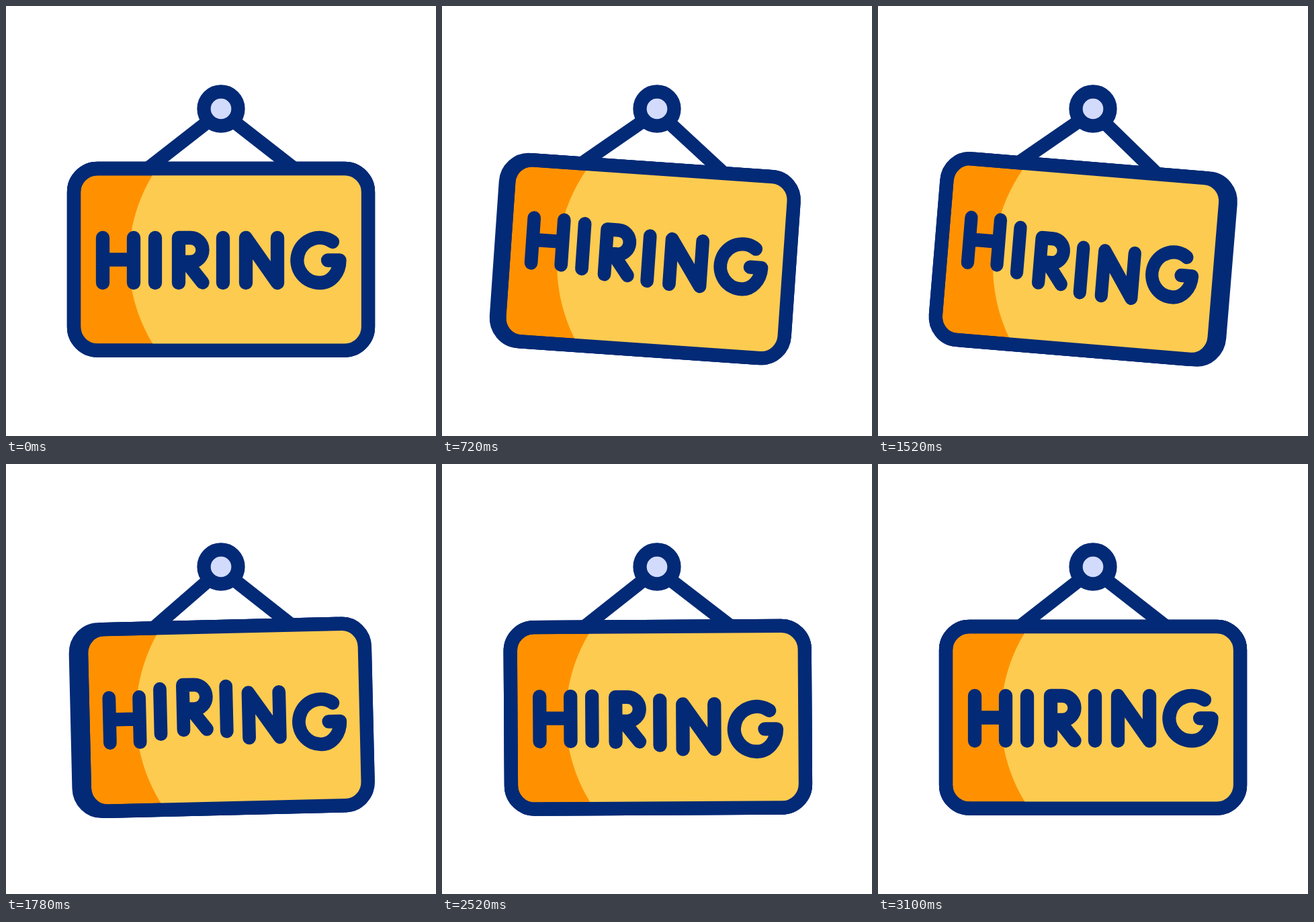
Animation of 640x640 px, one loop 3280 ms. Source, as an HTML page with a canvas:

```html
<!DOCTYPE html>
<html lang="en">
<head>
<meta charset="utf-8">
<title>Hiring sign</title>
<style>
html, body { margin: 0; width: 100%; height: 100%; overflow: hidden; background: #fff; }
canvas { display: block; width: 100vmin; height: 100vmin; }
</style>
</head>
<body>
<canvas id="stage" width="640" height="640"></canvas>
<script>
const ctx = document.getElementById('stage').getContext('2d');
const LOOP = 3280;
const NAVY = '#032a76', ORANGE = '#ff9100', YELLOW = '#fdcb50', PALE = '#d3dbfd';
const PEG = { x: 320, y: 153 };

// Keyframes: times paired with values, eased with a half cosine.
const swing = [[20, 415, 800, 1185, 1560, 1934, 2319, 2704, 3110], [0, -5, 5, -5, 5, -5, 5, -5, 0]];
const bounce = [[335, 750, 1165, 1580, 1995, 2410], [0, -17.5, 17.5, -17.5, 17.5, 0]];
const LETTER_DELAY = 95;

// The board turns left, right, then left again, resting flat in between.
const turns = (flat, a, b, c) =>
  [[100, 450, 811, 1245, 1668, 1995, 2320], [flat, a, flat, b, flat, c, flat]];
const depth = turns(0, -29.5, 27.5, -31.5);
const panelWidth = turns(1, .806, .817, .86);
const textWidth = turns(1, .812, .815, .898);
const stringWidth = turns(1, .82, .817, .78);

const letters = [
  'M144 345V412M190 345V412M144 377.5H190',
  'M222 345V412',
  'M257 412V345H274.5a18 18 0 0 1 0 36H257M270 383L292.5 411.5',
  'M323 345V412',
  'M357 412V345L404 412V345',
  'M486 351A33.5 33.5 0 1 0 468 412A28.5 33.5 0 0 0 496.5 378.5H479'
].map(d => new Path2D(d));

function at([times, values], t) {
  const i = times.findIndex(k => k > t);
  if (i === 0) return values[0];
  if (i < 0) return values[values.length - 1];
  const u = (t - times[i - 1]) / (times[i] - times[i - 1]);
  return values[i - 1] + (values[i] - values[i - 1]) * (1 - Math.cos(Math.PI * u)) / 2;
}

// Runs draw with x squeezed about the centre line and shifted by dx.
function squeezed(sx, dx, draw) {
  ctx.save();
  ctx.translate(PEG.x + dx, 0);
  ctx.scale(sx, 1);
  ctx.translate(-PEG.x, 0);
  draw();
  ctx.restore();
}

function panelPath(sx, dx) {
  ctx.beginPath();
  squeezed(sx, dx, () => ctx.roundRect(101, 242, 438, 270.6, 35));
}

function strings(t, angle) {
  const cos = Math.cos(angle), sin = Math.sin(angle);
  const reach = 109 * at(stringWidth, t), drop = 89;
  ctx.beginPath();
  for (const x of [-reach, reach]) {
    ctx.moveTo(PEG.x, PEG.y + 4);
    ctx.lineTo(PEG.x + x * cos - drop * sin, PEG.y + x * sin + drop * cos);
  }
  ctx.stroke();
}

function panel(t) {
  const sx = at(panelWidth, t);
  ctx.fillStyle = ORANGE;
  for (const dx of [at(depth, t), 0]) {
    panelPath(sx, dx);
    ctx.fill();
    ctx.stroke();
  }

  ctx.save();
  ctx.clip();
  ctx.fillStyle = YELLOW;
  ctx.beginPath();
  squeezed(sx, 0, () => ctx.arc(424, 377, 241, 0, 2 * Math.PI));
  ctx.fill();
  ctx.restore();
  panelPath(sx, 0);
  ctx.stroke();
}

function text(t) {
  squeezed(at(textWidth, t), 0, () => letters.forEach((letter, i) => {
    ctx.save();
    ctx.translate(0, at(bounce, t - i * LETTER_DELAY));
    ctx.stroke(letter);
    ctx.restore();
  }));
}

function peg() {
  ctx.beginPath();
  ctx.arc(PEG.x, PEG.y, 25.5, 0, 2 * Math.PI);
  ctx.fillStyle = PALE;
  ctx.fill();
  ctx.stroke();
}

function render(t) {
  const angle = at(swing, t) * Math.PI / 180;
  ctx.fillStyle = '#fff';
  ctx.fillRect(0, 0, 640, 640);
  ctx.strokeStyle = NAVY;
  ctx.lineWidth = 20.3;
  ctx.lineCap = ctx.lineJoin = 'round';

  strings(t, angle);
  ctx.save();
  ctx.translate(PEG.x, PEG.y);
  ctx.rotate(angle);
  ctx.translate(-PEG.x, -PEG.y);
  panel(t);
  text(t);
  ctx.restore();
  peg();
}

let start;
function tick(now) {
  start ??= now;
  render((now - start) % LOOP);
  requestAnimationFrame(tick);
}
requestAnimationFrame(tick);
</script>
</body>
</html>
```
